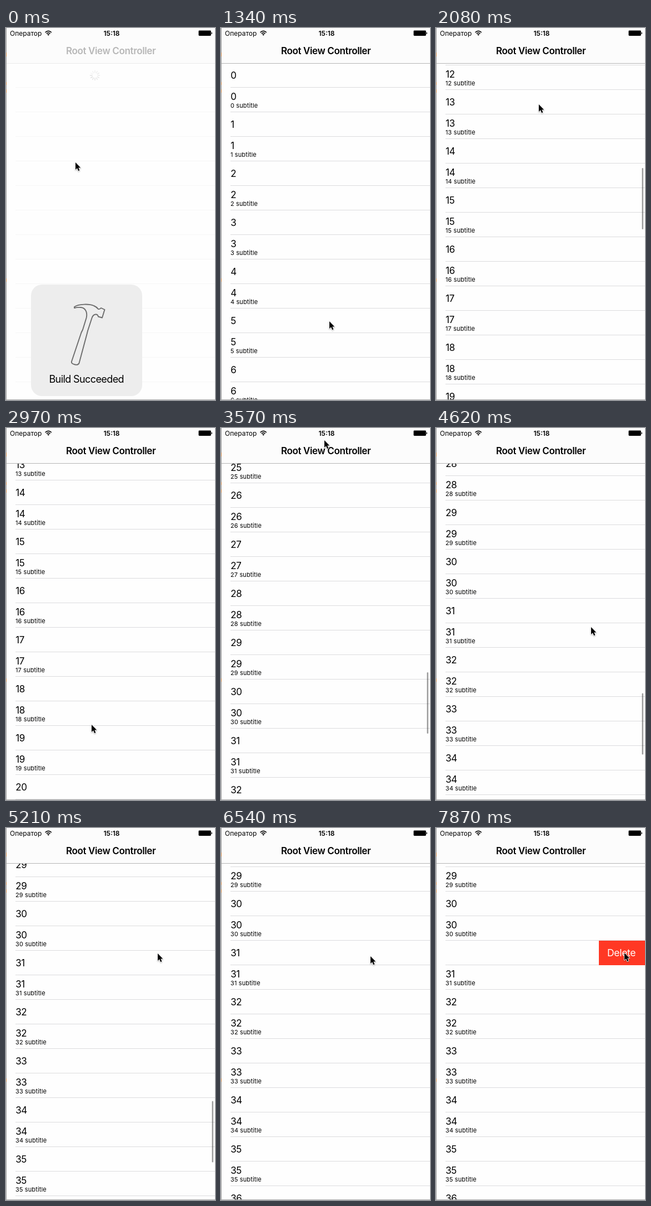
Write an HTML page that moves like this. It is 376x667 px and loops after 8 s.

```html
<!DOCTYPE html>
<html lang="en">
<head>
<meta charset="utf-8">
<title>Table view demo</title>
<style>
  html, body { margin: 0; width: 100%; height: 100%; overflow: hidden; background: #fefefe; }
  svg { display: block; width: 376px; height: 667px; font-family: Inter, Roboto, sans-serif; }
  .bold { font-weight: 600; text-anchor: middle; }
  .label { font-size: 17px; letter-spacing: -.35px; }
  .note { font-size: 11px; letter-spacing: .12px; }
</style>
</head>
<body>
<svg viewBox="0 0 376 667">
  <defs>
    <clipPath id="below"><rect x="1" y="64" width="375" height="603"/></clipPath>
  </defs>
  <rect width="376" height="667" fill="#fefefe"/>

  <g clip-path="url(#below)">
    <g id="rows"></g>
    <g id="del">
      <rect y="202" width="83" height="44" fill="#ff3824"/>
      <text x="15" y="230" font-size="17.5" letter-spacing="-.3" fill="#fff">Delete</text>
    </g>
    <g id="spinner" stroke="#8e8e8e" stroke-width="1.6" stroke-linecap="round"></g>
    <rect id="bar" x="370.5" width="2.5" height="110" rx="1.25"/>
  </g>

  <rect width="376" height="63" fill="#fcfcfc"/>
  <rect id="rule" y="63" width="376" height="1" fill="#b6b6b6"/>
  <text x="7" y="13.5" font-size="12">Оператор</text>
  <g fill="none" stroke="#000" stroke-width="1.7">
    <path d="M70.6 8 Q76.2 2.6 81.8 8"/>
    <path d="M72.9 10.2 Q76.2 7 79.5 10.2"/>
  </g>
  <path d="M76.2 13.8 L74.2 11.6 Q76.2 9.9 78.2 11.6Z"/>
  <text class="bold" x="190" y="13.5" font-size="12">15:18</text>
  <rect x="346.5" y="4.6" width="22.3" height="9.4" rx="1.4"/>
  <path d="M369.5 7.5 Q371 7.8 371 9.3 Q371 10.8 369.5 11.1Z"/>
  <text id="title" class="bold" x="188.7" y="47" font-size="17" letter-spacing="-.37">Root View Controller</text>

  <rect width="1" height="667" fill="#9c9c9c"/>
  <path d="M.5 44v7M.5 97v5M.5 110v6M.5 449v6" stroke="#d08a4a"/>
  <rect y="666" width="376" height="1" fill="#a9a9a9"/>

  <g id="hud">
    <rect x="45" y="460" width="200" height="200" rx="20" fill="#ededed"/>
    <path fill="none" stroke="#6c6c6c" stroke-width="1.9" stroke-linejoin="round"
      d="M123 500 C131 494.5 150 494.5 158 498 Q163 500 166 504 Q169 504.5 171 502 L177.5 505 L173 519.5 L166 517.5 Q165 513 161 513.5 Q156.5 514 154.5 520 L147 543 L145.5 549 L131.5 601 Q129.5 605 124 603.5 Q117 602 118 598 L135.5 546 L138 541 L144.5 520 C147 510 143 502 135 501 Q128 500.5 123 502Z"/>
    <text x="144.7" y="636" font-size="18" letter-spacing="-.6" text-anchor="middle">Build Succeeded</text>
  </g>

  <g id="cursor">
    <path d="M0 0V13L3 10.2L5.2 15.2L7.4 14.3L5.3 9.5H9.3Z"
      stroke="#fff" stroke-width="1.6" paint-order="stroke" stroke-linejoin="round"
      style="filter: drop-shadow(0 1px 1px rgba(0,0,0,.3))"/>
  </g>
</svg>

<script>
// The screen refreshes at a low rate, so all times below are counted in ticks.
const TICK = 148.4, TICKS = 54;
const ROW = 44, FIRST_LINE = 106, SWIPED_ROW = 62, BUTTON = 83;

const home = { x: 125, y: 241 };
const moves = [
  { start: 1, end: 8, x: 195, y: 526 },
  { start: 9, end: 12, x: 188, y: 105 },
  { start: 13, end: 19, x: 154, y: 532 },
  { start: 20, end: 23, x: 186, y: 22 },
  { start: 24, end: 27, x: 206, y: 131 },
  { start: 28, end: 30, x: 280, y: 372 },
  { start: 30, end: 35, x: 273, y: 225 },
  { start: 36, end: 42, x: 269, y: 230 },
  { start: 44, end: 47, x: 178, y: 228 },
  { start: 50, end: 53, x: 339, y: 224 }
];
const flicks = [
  { start: 9, end: 18, distance: 1201 },
  { start: 20, end: 27, distance: 1141 },
  { start: 28, end: 40, distance: 247 }
];

const $ = id => document.getElementById(id);
const set = (id, name, value) => $(id).setAttribute(name, value);
const clamp = p => Math.min(1, Math.max(0, p));
const progress = (tick, { start, end }) => clamp((tick - start) / (end - start));
const easeOut = p => 1 - (1 - p) ** 3;
const smooth = p => p * p * (3 - 2 * p);

function add(parent, tag, attrs = {}) {
  const node = document.createElementNS('http://www.w3.org/2000/svg', tag);
  for (const key in attrs) node.setAttribute(key, attrs[key]);
  return parent.appendChild(node);
}

const rows = Array.from({ length: 16 }, () => {
  const g = add($('rows'), 'g');
  return {
    g,
    line: add(g, 'rect', { x: 17, width: 359, height: 1, fill: '#dcdcde' }),
    label: add(g, 'text', { class: 'label' }),
    note: add(g, 'text', { class: 'note', x: 17, y: -7 })
  };
});

const spokes = Array.from({ length: 12 }, (_, i) => add($('spinner'), 'line', {
  x1: 160, x2: 160, y1: 76.5, y2: 80, transform: `rotate(${i * 30} 160 85)`
}));

function cursorAt(tick) {
  let { x, y } = home;
  for (const move of moves) {
    const p = smooth(progress(tick, move));
    x += (move.x - x) * p;
    y += (move.y - y) * p;
  }
  return [Math.round(x), Math.round(y)];
}

function scrollAt(tick) {
  return Math.round(flicks.reduce((sum, f) => sum + f.distance * easeOut(progress(tick, f)), 0));
}

// The indicator shows during a flick and fades over two ticks after it.
function barOpacity(tick) {
  return Math.max(...flicks.map(f => tick > f.start ? clamp((f.end + 2 - tick) / 2) : 0));
}

function drawRows(scroll, loaded, swipe, launch) {
  const top = Math.max(0, Math.floor(scroll / ROW) - 1);
  rows.forEach((row, i) => {
    const index = top + i, n = index >> 1, sub = index % 2;
    row.g.setAttribute('transform', `translate(0 ${FIRST_LINE + index * ROW - scroll})`);
    row.line.setAttribute('opacity', launch);
    row.label.textContent = loaded ? n : '';
    row.label.setAttribute('x', 17.2 - (index === SWIPED_ROW ? swipe : 0));
    row.label.setAttribute('y', sub ? -21 : -15);
    row.note.textContent = loaded && sub ? `${n} subtitle` : '';
  });
}

function draw(tick) {
  const scroll = scrollAt(tick);
  const swipe = Math.round(BUTTON * progress(tick, { start: 44, end: 47 }));
  const launch = tick ? 1 : .27;
  const loaded = tick >= 7;

  drawRows(scroll, loaded, swipe, launch);
  set('title', 'opacity', launch);
  set('rule', 'opacity', launch);
  set('hud', 'opacity', 1 - progress(tick, { start: 2, end: 6 }));
  set('cursor', 'transform', `translate(${cursorAt(tick)})`);
  set('bar', 'y', 74 + scroll * .1616);
  set('bar', 'opacity', .38 * barOpacity(tick));
  set('del', 'transform', `translate(${376 - swipe} 0)`);

  set('spinner', 'visibility', loaded ? 'hidden' : 'visible');
  spokes.forEach((spoke, i) => {
    const age = (tick * 2 + 21 - i) % 12;
    spoke.setAttribute('opacity', launch * (.9 - age * .055));
  });
}

const begin = performance.now();
function frame() {
  const time = (performance.now() - begin) % 8000;
  draw(Math.min(TICKS - 1, Math.floor(time / TICK)));
  requestAnimationFrame(frame);
}
draw(0);
requestAnimationFrame(frame);
</script>
</body>
</html>
```
